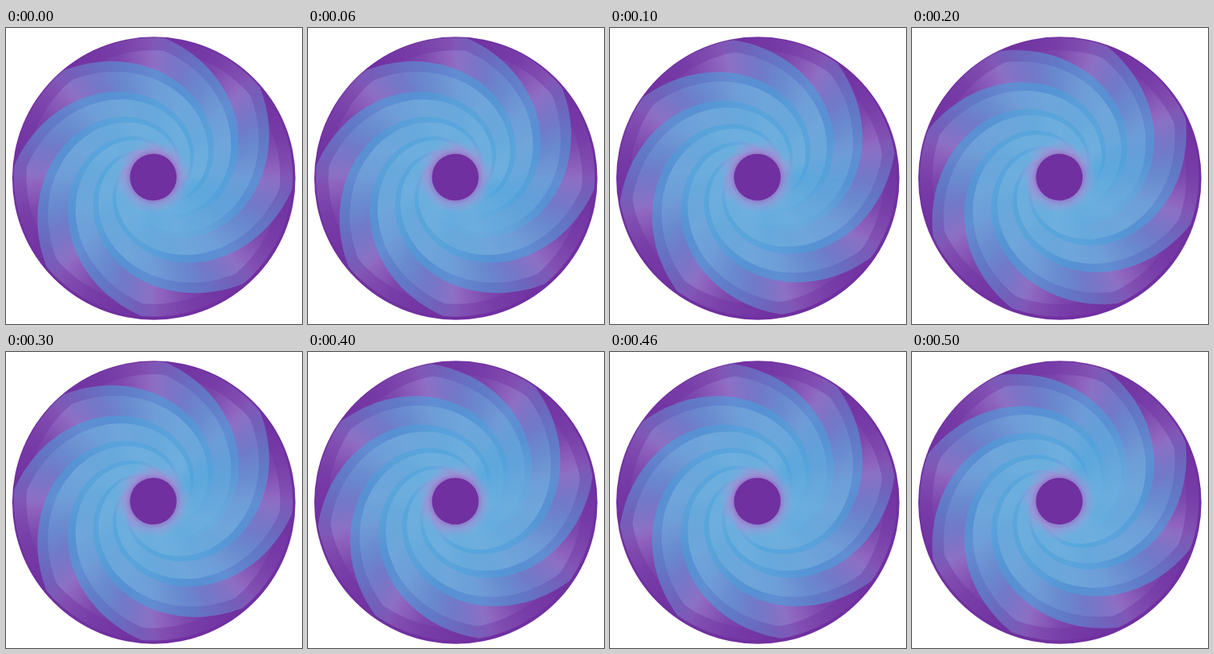
Animation, 378 px wide and 378 px high, one loop 0.6 s. Source, as an HTML page with a canvas:

```html
<!DOCTYPE html>
<html lang="en">
<head>
<meta charset="utf-8">
<title>Swirling disc</title>
<style>
html, body { margin: 0; width: 100%; height: 100%; overflow: hidden; background: #fff; }
canvas { display: block; }
</style>
</head>
<body>
<canvas id="stage" width="378" height="378"></canvas>
<script>
const ctx = document.getElementById('stage').getContext('2d');
const TAU = Math.PI * 2, DEG = TAU / 360;
const PURPLE = '#7030a0';
const BLADES = 8, LOOP = 600, STEPS = 6;
const HEAD = -42, TAIL = 240;   // angular reach of a blade around its tip
const TIP = -42;                // angle of the first tip at time zero

const blue = a => `rgba(68,162,220,${a})`;
const pale = a => `rgba(134,186,225,${a})`;
const lilac = a => `rgba(164,140,214,${a})`;

// Colours along a blade, each at its angle from the tip.
function sweep(...stops) {
  const g = ctx.createConicGradient(HEAD * DEG, 0, 0);
  for (const [deg, color] of stops) g.addColorStop((deg - HEAD) / 360, color);
  return g;
}

function radius(deg) {
  return Math.min(178, 30 + 150 * (1 - deg / TAIL) ** 1.7);
}

function blade(scale) {
  const path = new Path2D();
  for (let deg = HEAD; deg <= TAIL; deg += 2) {
    const r = radius(deg) * scale;
    path.lineTo(r * Math.cos(deg * DEG), r * Math.sin(deg * DEG));
  }
  path.lineTo(0, 0);
  path.closePath();
  return path;
}

const outer = blade(1), inner = blade(.91);

// Painted in order: faint heads first, then the blue bodies above them.
const layers = [
  [outer, sweep([-42, lilac(0)], [-20, lilac(.14)], [-3, lilac(.38)], [12, lilac(.25)], [35, lilac(0)])],
  [inner, sweep([-36, lilac(0)], [-18, lilac(.12)], [-1, lilac(.45)], [18, lilac(.3)], [40, lilac(0)])],
  [outer, sweep([-6, blue(0)], [10, blue(.32)], [24, blue(.52)], [45, blue(.6)], [75, blue(.5)],
    [150, blue(.45)], [190, lilac(.4)], [240, lilac(.35)], [250, lilac(0)])],
  [inner, sweep([14, pale(0)], [34, pale(.28)], [62, pale(.5)], [90, pale(.32)], [120, pale(.45)],
    [160, pale(.35)], [200, lilac(.35)], [240, lilac(.3)], [250, lilac(0)])]
];

const halo = ctx.createRadialGradient(0, 0, 29, 0, 0, 48);
halo.addColorStop(0, 'rgba(150,105,195,.75)');
halo.addColorStop(.35, 'rgba(165,140,212,.5)');
halo.addColorStop(1, 'rgba(140,170,220,0)');

function disc(x, y, r, fill) {
  ctx.beginPath();
  ctx.arc(x, y, r, 0, TAU);
  ctx.fillStyle = fill;
  ctx.fill();
}

function paint(path, fill) {
  ctx.fillStyle = fill;
  ctx.fill(path);
}

function ring(parts) {
  for (let i = 0; i < BLADES; i++) {
    for (const [path, fill] of parts) paint(path, fill);
    ctx.rotate(-TAU / BLADES);
  }
}

function draw(turn) {
  ctx.clearRect(0, 0, 378, 378);
  ctx.save();
  disc(188.8, 192, 180.8, PURPLE);
  ctx.clip();
  ctx.translate(188.1, 190.5);
  ctx.rotate(TIP * DEG - turn);
  ring(layers.slice(0, 2));
  ring(layers.slice(2));
  disc(0, 0, 48, halo);
  disc(0, 0, 29.8, PURPLE);
  ctx.restore();
}

// A quarter turn per loop, in six held poses.
const start = performance.now();
function tick() {
  const t = (performance.now() - start) % LOOP;
  draw(Math.floor(t / LOOP * STEPS) / STEPS * TAU / 4);
  requestAnimationFrame(tick);
}
tick();
</script>
</body>
</html>
```
